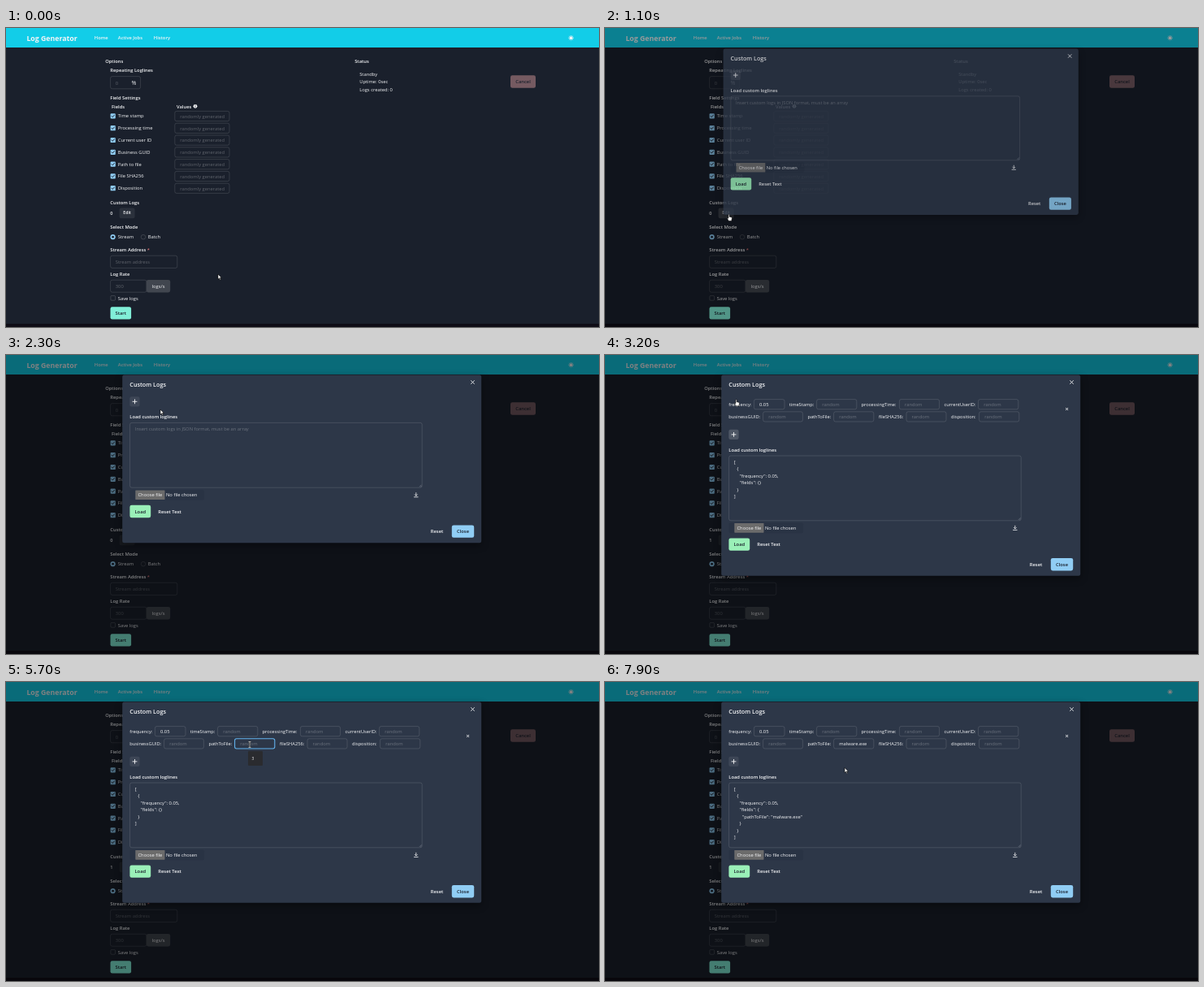
An HTML page for the animation above (8000 ms loop, 730 px wide and 368 px high).

```html
<!DOCTYPE html>
<html lang="en">
<head>
<meta charset="utf-8">
<title>Log Generator</title>
<style>
  html, body { margin: 0; width: 100%; height: 100%; overflow: hidden; background: #1a202c; }
  svg { display: block; width: 730px; height: 368px; }
  text { font-family: "Open Sans", "Noto Sans", sans-serif; white-space: pre; }
  #panel { filter: drop-shadow(0 3px 5px rgba(0, 0, 0, .4)); }
</style>
</head>
<body>
<svg id="stage" viewBox="0 0 730 368" xmlns="http://www.w3.org/2000/svg"></svg>
<script>
const LOOP = 8000, STEP = 100, ADDED = 3200, BLUR = 7600, GROW = 40.6;
const INK = '#1a202c', WHITE = '#f4f5f7', BLUE = '#90cdf4', HINT = 'rgba(255,255,255,.3)';

// y is the middle of the capital letters
function text(x, y, s, { size = 5.8, weight = 400, fill = WHITE, id = '', anchor = 'start' } = {}) {
  return `<text x="${x}" y="${y + size * .355}" font-size="${size}" font-weight="${weight}"
    fill="${fill}" text-anchor="${anchor}" id="${id}">${s}</text>`;
}
const bold = (x, y, s, o = {}) => text(x, y, s, { weight: 600, ...o });
const hint = (x, y, s, o = {}) => text(x, y, s, { fill: HINT, ...o });
const rect = (x, y, w, h, fill, r = 2.3, extra = '') =>
  `<rect x="${x}" y="${y}" width="${w}" height="${h}" rx="${r}" fill="${fill}" ${extra}/>`;
const field = (x, y, w, h, extra = '') =>
  rect(x, y, w, h, 'none', 2.2, `stroke="#fff" stroke-opacity=".17" stroke-width=".7" ${extra}`);
const line = (d, color, w = .8) =>
  `<path d="${d}" fill="none" stroke="${color}" stroke-width="${w}" stroke-linecap="round" stroke-linejoin="round"/>`;
const button = (x, y, w, h, fill, label, color = INK) =>
  rect(x, y, w, h, fill) + bold(x + w / 2, y + h / 2, label, { fill: color, anchor: 'middle' });

function checkRow(label, i) {
  const y = 108.4 + i * 14.8;
  return rect(128.6, y - 3.1, 6.2, 6.2, BLUE, .9)
    + line(`M130.1 ${y} l1.2 1.3 l2.1 -2.6`, INK, .9)
    + text(137.8, y, label)
    + field(207.8, y - 6, 67.2, 12.2) + hint(214.2, y + .4, 'randomly generated');
}

function sun(x, y) {
  let rays = '';
  for (let i = 0; i < 8; i++)
    rays += `<path d="M${x} ${y - 2.4}v-.8" transform="rotate(${i * 45} ${x} ${y})" stroke="${WHITE}" stroke-width="1"/>`;
  return `<circle cx="${x}" cy="${y}" r="2" fill="${WHITE}"/>` + rays;
}

const page = () => rect(0, 0, 730, 368, INK, 0)
  + rect(0, 0, 730, 24, '#12cde8', 0)
  + rect(0, 364, 730, 4, '#0f0d16', 0)
  + text(25.4, 12.6, 'Log Generator', { size: 8.75, weight: 700 })
  + bold(108.8, 12.2, 'Home') + bold(137.8, 12.2, 'Active Jobs') + bold(181.8, 12.2, 'History')
  + sun(695.6, 12.2)
  + bold(122.2, 40.8, 'Options')
  + bold(128.3, 51.6, 'Repeating Loglines')
  + field(128.6, 59.6, 37, 15.2) + hint(134.8, 67.6, '0') + text(154.4, 67.6, '%', { size: 7 })
  + bold(128.3, 85.6, 'Field Settings')
  + bold(130, 96.6, 'Fields') + bold(210, 96.6, 'Values')
  + `<circle cx="233" cy="96.3" r="2.4" fill="${WHITE}"/>` + line('M233 96v1.3M233 94.9v.05', INK, .7)
  + ['Time stamp', 'Processing time', 'Current user ID', 'Business GUID', 'Path to file',
     'File SHA256', 'Disposition'].map(checkRow).join('')
  + bold(128.3, 214.5, 'Custom Logs')
  + bold(128.2, 228.1, '0', { id: 'count', size: 5.5 })
  + rect(139.6, 221.6, 19, 12.6, '#fff', 2.2, 'id="edit"')
  + bold(149.1, 227.6, 'Edit', { size: 5.2, anchor: 'middle' })
  + bold(128.3, 245, 'Select Mode')
  + `<circle cx="131.6" cy="257.2" r="3.1" fill="${BLUE}"/><circle cx="131.6" cy="257.2" r="1.4" fill="${INK}"/>`
  + text(137.8, 257.3, 'Stream')
  + `<circle cx="169" cy="257.2" r="2.8" fill="none" stroke="#fff" stroke-opacity=".2" stroke-width=".7"/>`
  + text(174.8, 257.3, 'Batch')
  + bold(128.3, 272.7, 'Stream Address') + text(173.8, 272.7, '*', { fill: '#fc8181' })
  + field(128.6, 280.2, 82.2, 15.2) + hint(134.8, 288.2, 'Stream address')
  + bold(128.3, 302.8, 'Log Rate')
  + field(128.6, 310.2, 44.4, 15) + hint(134.8, 318.2, '300')
  + rect(172.8, 309.9, 29.4, 15.5, '#41464f') + text(187.5, 318, 'logs/s', { anchor: 'middle' })
  + rect(128.9, 329.6, 5.6, 5.6, 'none', .9, 'stroke="#fff" stroke-opacity=".22" stroke-width=".7"')
  + text(137.8, 332.7, 'Save logs')
  + button(128.5, 343.2, 25.6, 15.4, '#81efd8', 'Start')
  + bold(429.2, 40.8, 'Status')
  + text(435.2, 56.6, 'Standby') + text(435.2, 66.4, 'Uptime: 0sec') + text(435.2, 76.1, 'Logs created: 0')
  + `<g opacity=".4">${button(621, 58.2, 31, 15.6, '#feb2b2', 'Cancel')}</g>`;

// label x, input x, input width, label
const rows = [
  [[152.3, 183.4, 37.6, 'frequency'], [226.7, 260.6, 49.2, 'timeStamp'],
   [315.5, 362.4, 49.2, 'processingTime'], [417.5, 459.6, 49.2, 'currentUserID']],
  [[152.3, 194.6, 48.8, 'businessGUID'], [249.4, 281.6, 49.2, 'pathToFile'],
   [337, 371, 49, 'fileSHA256'], [426, 460.6, 49.2, 'disposition']]
];

function entry() {
  let out = '';
  rows.forEach((row, r) => row.forEach(([lx, x, w, label]) => {
    const y = 60.7 + r * 15.2, path = label === 'pathToFile';
    out += text(lx, y, label + ':', { size: 5.7 }) + field(x, y - 6.1, w, 12.2, path ? 'id="path"' : '');
    out += label === 'frequency' ? text(x + 6.6, y + .3, '0.05') : hint(x + 6.6, y + .3, 'random', { id: path ? 'typed' : '' });
  }));
  return out + line('M567.4 65.3l2.4 2.4M569.8 65.3l-2.4 2.4', WHITE, .9);
}

const modal = () => rect(0, 0, 730, 368, '#000', 0, 'id="shade"')
  + `<g id="modal"><g id="panel">${rect(143.2, 24.4, 442, 206.8, '#2d3748', 2.5, 'id="box"')}</g>`
  + bold(152.3, 36.7, 'Custom Logs', { size: 7.25 })
  + line('M572.6 31.6l3.8 3.8M576.4 31.6l-3.8 3.8', WHITE, .9)
  + `<g id="entry">${entry()}</g><g id="lower">`
  + rect(152.3, 51.2, 12.3, 12.2, '#fff', 2.2, 'id="plus"') + line('M156 57.3h5M158.5 54.8v5', WHITE, .9)
  + bold(152.3, 76, 'Load custom loglines')
  + field(152.6, 83.4, 359.6, 79.8) + line('M509.2 162l2 -2M510.6 162.2l.8 -.8', '#a0a8b4', .4)
  + hint(158.8, 91.3, 'Insert custom logs in JSON format, must be an array', { id: 'prompt' })
  + '<g id="json"></g>'
  + rect(152.5, 166, 91.5, 12.6, '#293344', 2)
  + rect(159.3, 166.4, 36.2, 11.7, '#6b6b6b', .6)
  + text(177.4, 172.4, 'Choose file', { anchor: 'middle' }) + text(197, 172.4, 'No file chosen')
  + line('M504.8 169.6v3.4M503.3 171.8l1.5 1.5l1.5 -1.5M502.5 174.8h4.6', WHITE, .8)
  + button(152.4, 184.8, 25.8, 15.4, '#9af0b8', 'Load')
  + bold(187.3, 192.8, 'Reset Text') + bold(522.8, 217.3, 'Reset')
  + button(548.8, 209.4, 27.4, 15.4, BLUE, 'Close')
  + `</g><g id="tip">${rect(298, 85, 18, 18, '#2a2b2f', 1)}${text(302.6, 94.2, '3', { size: 4.8 })}</g></g>`;

const outlined = 'stroke="#000" stroke-width=".6" stroke-linejoin="round" fill="#fff"';
const pointers = `<g id="arrow"><path d="M0 0V6.2L1.5 4.9L2.6 7.3L3.6 6.8L2.5 4.5H4.4Z" ${outlined}/></g>
  <g id="hand"><path d="M-.6 .6Q0 -.5 .7 .6V3.1L3.4 3.7Q4 4 3.9 5L3.3 8.2H-.3L-2 5.2Q-1.8 4.2 -.6 5Z" ${outlined}/></g>
  <g id="beam">${line('M-1.5 -3.4H1.5M0 -3.4V3.4M-1.5 3.4H1.5', '#111', 1.3)}${line('M-1.3 -3.4H1.3M0 -3.4V3.4M-1.3 3.4H1.3', '#fff', .6)}</g>`;

const stage = document.getElementById('stage');
stage.innerHTML = page() + modal() + pointers;
const $ = id => document.getElementById(id);
const show = (id, on) => $(id).setAttribute('display', on ? 'inline' : 'none');
const move = (id, x, y) => $(id).setAttribute('transform', `translate(${x} ${y})`);

// time, x, y
const path = [
  [0, 261, 303], [200, 195, 342], [300, 145, 318], [400, 135, 235], [500, 140, 172], [600, 147, 141],
  [800, 147, 141], [900, 150, 195], [1000, 152.5, 229.2], [1200, 152.5, 229.2], [1700, 238, 203],
  [2000, 222, 135], [2300, 190, 67], [2600, 166, 57], [2700, 163, 57], [2800, 161.5, 54.6],
  [3400, 161.5, 54.6], [3800, 205, 66], [4100, 262, 88], [4300, 289, 87], [4400, 295, 81], [4500, 300, 77],
  [7100, 300, 77], [7200, 299, 78], [7300, 297, 92], [7400, 295, 105.4], [8000, 295, 105.4]
];
const kinds = [[0, 'arrow'], [1000, 'hand'], [1200, 'arrow'], [2700, 'hand'], [3300, 'arrow'],
  [4400, 'beam'], [5800, ''], [7200, 'beam'], [7300, 'arrow']];
const typing = [[0, 0], [5800, 1], [5900, 2], [6000, 3], [6100, 4], [6200, 6], [6300, 7], [6400, 8],
  [6500, 9], [6700, 10], [6800, 11]];
const at = (table, t) => table.filter(k => k[0] <= t).pop()[1];

function pointerAt(t) {
  const i = path.findIndex(k => k[0] > t);
  const [t0, x0, y0] = path[i - 1], [t1, x1, y1] = path[i];
  const p = (t - t0) / (t1 - t0);
  return [x0 + (x1 - x0) * p, y0 + (y1 - y0) * p];
}

const shortJson = ['[', ' {', '  "frequency": 0.05,', '  "fields": {}', ' }', ']'];
const longJson = [...shortJson.slice(0, 3), '  "fields": {', '   "pathToFile": "malware.exe"', '  }', ' }', ']'];
const jsonText = lines => lines.map((s, i) =>
  text(158.8 + s.search(/\S/) * 3.4, 91.4 + i * 8.42, s.trim())).join('');
let shown = null;

function render(t) {
  const open = 1 - (1 - Math.min(1, Math.max(0, (t - 1020) / 200))) ** 3;
  const added = t >= ADDED, focus = t >= 5100 && t < BLUR;
  $('shade').setAttribute('opacity', open * .48);
  $('modal').setAttribute('opacity', open);
  $('modal').setAttribute('transform', `translate(364.2 127.8) scale(${.95 + .05 * open}) translate(-364.2 -127.8)`);
  $('box').setAttribute('height', 206.8 + (added ? GROW : 0));
  move('lower', 0, added ? GROW : 0);
  show('entry', added);
  show('prompt', !added);
  $('count').textContent = added ? 1 : 0;
  $('edit').setAttribute('opacity', t >= 1000 && t < 1200 ? .16 : .08);
  $('plus').setAttribute('opacity', t >= 2700 && t < 3500 ? .16 : .08);

  const lines = !added ? [] : t < BLUR ? shortJson : longJson;
  if (lines.length !== shown) {
    $('json').innerHTML = jsonText(lines);
    shown = lines.length;
  }

  const n = at(typing, t);
  $('typed').textContent = n ? 'malware.exe'.slice(0, n) : 'random';
  $('typed').setAttribute('fill', n ? WHITE : HINT);
  const ring = $('path');
  ring.setAttribute('stroke', focus ? '#63b3ed' : '#fff');
  ring.setAttribute('stroke-opacity', focus ? 1 : .17);
  ring.setAttribute('stroke-width', focus ? 1.1 : .7);
  show('tip', t >= 5200 && t < 5800);

  const kind = at(kinds, t), [x, y] = pointerAt(t);
  for (const id of ['arrow', 'hand', 'beam']) {
    show(id, id === kind);
    move(id, x, y);
  }
}

const start = performance.now();
function tick() {
  const t = (performance.now() - start) % LOOP;
  render(Math.floor(t / STEP) * STEP);
  requestAnimationFrame(tick);
}
tick();
</script>
</body>
</html>
```
